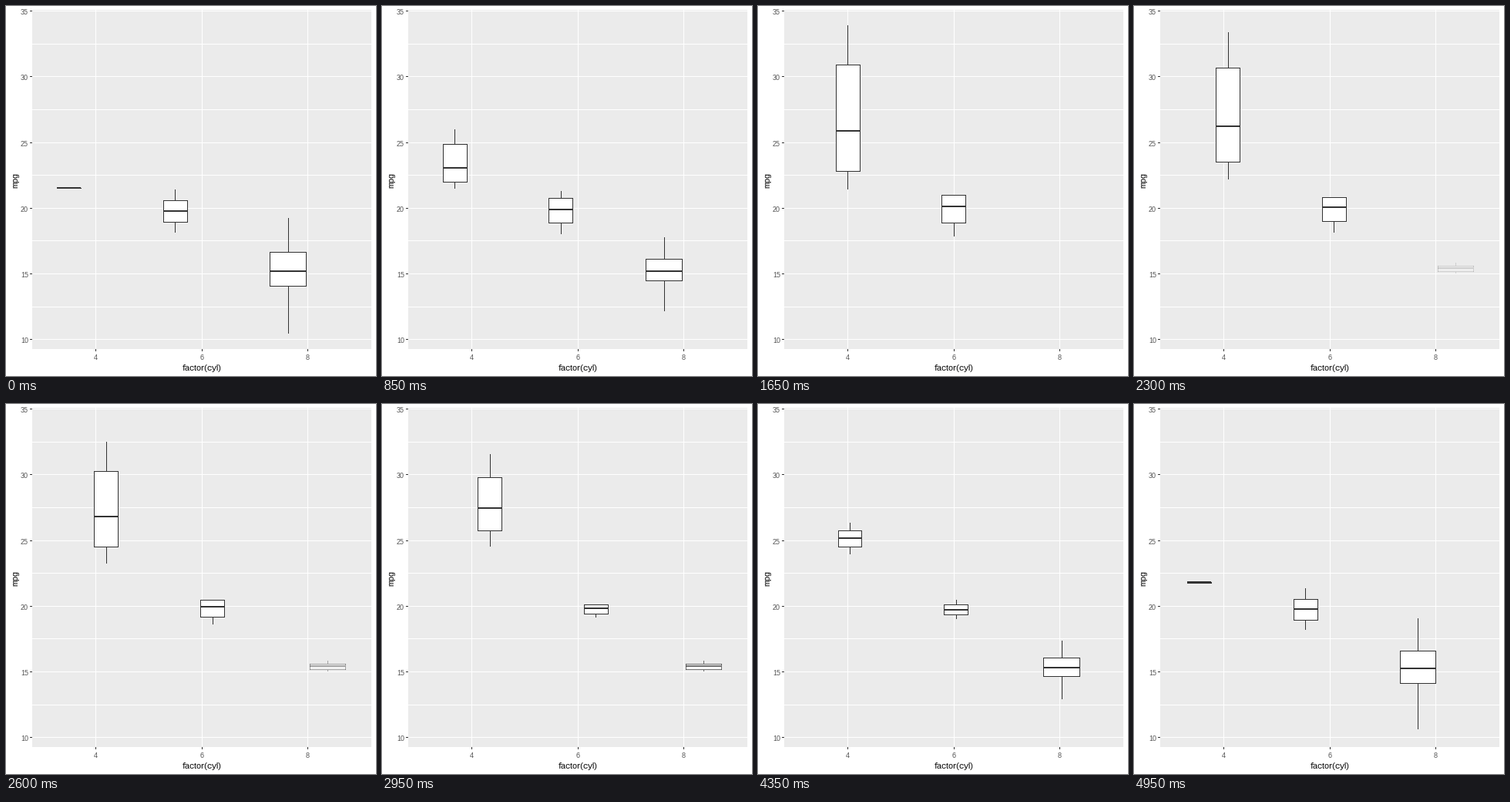
Recreate the animation shown at these times as a matplotlib script. Size 480 by 480 pixels, loop 5 s.

```python
import math

import matplotlib.pyplot as plt
import numpy as np
from matplotlib.animation import FuncAnimation
from matplotlib.patches import Rectangle

plt.rcParams.update({
    "font.family": "Liberation Sans",
    "text.hinting": "native",
    "text.hinting_factor": 1,
})

SIZE, FRAMES, STEP = 480, 100, 50
LEFT, TOP, RIGHT, BOTTOM = 34, 5, 474, 445
INK, PANEL, LABEL = "#333333", "#EBEBEB", "#4D4D4D"

# mpg by gear, then by number of cylinders
MPG = {
    3: {4: [21.5],
        6: [21.4, 18.1],
        8: [18.7, 14.3, 16.4, 17.3, 15.2, 10.4,
            10.4, 14.7, 15.5, 15.2, 13.3, 19.2]},
    4: {4: [22.8, 24.4, 22.8, 32.4, 30.4, 33.9, 27.3, 21.4],
        6: [21.0, 21.0, 19.2, 17.8]},
    5: {4: [26.0, 30.4],
        6: [19.7],
        8: [15.8, 15.0]},
}
GEARS = list(MPG)
# (last still frame, arrival frame) of each change of gear
MOVES = [(8, 33), (42, 67), (76, 100)]


def px(u):
    return math.floor(34.05 + 137.64 * (u - 0.4))


def py(v):
    return math.floor(425.87 - 17.04 * (v - 10.4))


def summarise(gear):
    """Map cylinders to [x, min, q1, median, q3, max], boxes dodged by gear."""
    boxes = {}
    for cyl, values in MPG[gear].items():
        gears = [g for g in GEARS if cyl in MPG[g]]
        n = len(gears)
        x = cyl / 2 - 1 + 0.75 * ((gears.index(gear) + 0.5) / n - 0.5)
        boxes[cyl] = np.array([x, *np.percentile(values, [0, 25, 50, 75, 100])])
    return boxes


STATES = [summarise(g) for g in GEARS]
HALF = {cyl: 0.3375 / sum(cyl in MPG[g] for g in GEARS) for cyl in (4, 6, 8)}

fig = plt.figure(figsize=(SIZE / 72, SIZE / 72), dpi=72, facecolor="white")
ax = fig.add_axes([0, 0, 1, 1])
ax.set(xlim=(0, SIZE), ylim=(SIZE, 0))
ax.axis("off")


def rect(x0, y0, x1, y1, color, alpha=1):
    return ax.add_patch(Rectangle((x0, y0), x1 - x0, y1 - y0, facecolor=color,
                                  linewidth=0, alpha=alpha, antialiased=False))


def draw_axes():
    rect(LEFT, TOP, RIGHT, BOTTOM, PANEL)
    for v in np.arange(10, 35.1, 2.5):
        y = py(v)
        rect(LEFT, y, RIGHT, y + 1, "white")
        if v % 5 == 0:
            rect(LEFT - 3, y, LEFT, y + 1, INK)
            ax.text(29, y + 5, f"{v:.0f}", size=9, color=LABEL, ha="right")
    for cyl in (4, 6, 8):
        x = px(cyl / 2 - 1)
        rect(x, TOP, x + 1, BOTTOM, "white")
        rect(x, BOTTOM, x + 1, BOTTOM + 3, INK)
        ax.text(x, 459, str(cyl), size=9, color=LABEL, ha="center")
    ax.text(254.3, 473, "factor(cyl)", size=11, ha="center")
    ax.text(15, 225.5, "mpg", size=11, ha="center", va="baseline",
            rotation=90, rotation_mode="anchor")


def draw_box(cyl, stats, alpha):
    x, *values = stats
    low, q1, med, q3, high = map(py, values)
    mid, x0, x1 = px(x), px(x - HALF[cyl]), px(x + HALF[cyl])
    parts = [
        (mid, high, mid + 1, q3),
        (mid, q1 + 1, mid + 1, low),
        (x0, q3, x1 + 1, q3 + 1),
        (x0, q1, x1 + 1, q1 + 1),
        (x0, q3, x0 + 1, q1 + 1),
        (x1, q3, x1 + 1, q1 + 1),
        (x0, med - 1, x1, med + 1),
    ]
    shapes = [rect(x0, q3, x1 + 1, q1 + 1, "white", alpha)]
    shapes += [rect(*p, INK, alpha) for p in parts if p[3] > p[1]]
    return shapes


def boxes_at(frame):
    """Yield (cyl, stats, alpha) for every box visible in this frame."""
    i = sum(frame >= end for _, end in MOVES)
    start, end = MOVES[i]
    p = max(0, (frame - start) / (end - start))
    now, then = STATES[i], STATES[(i + 1) % len(STATES)]
    for cyl in (4, 6, 8):
        if cyl in now and cyl in then:
            yield cyl, now[cyl] + p * (then[cyl] - now[cyl]), 1
        elif cyl in now:
            # leaves by shrinking onto its median
            flat = now[cyl].copy()
            flat[1:] = flat[3]
            yield cyl, now[cyl] + p * (flat - now[cyl]), 1
        elif p > 0:
            # enters by fading in
            yield cyl, then[cyl], p


shown = []


def update(frame):
    while shown:
        shown.pop().remove()
    for box in boxes_at(frame):
        shown.extend(draw_box(*box))
    return shown


draw_axes()
anim = FuncAnimation(fig, update, frames=FRAMES, interval=STEP,
                     init_func=lambda: update(0), repeat=True, repeat_delay=0)
plt.show()
```
